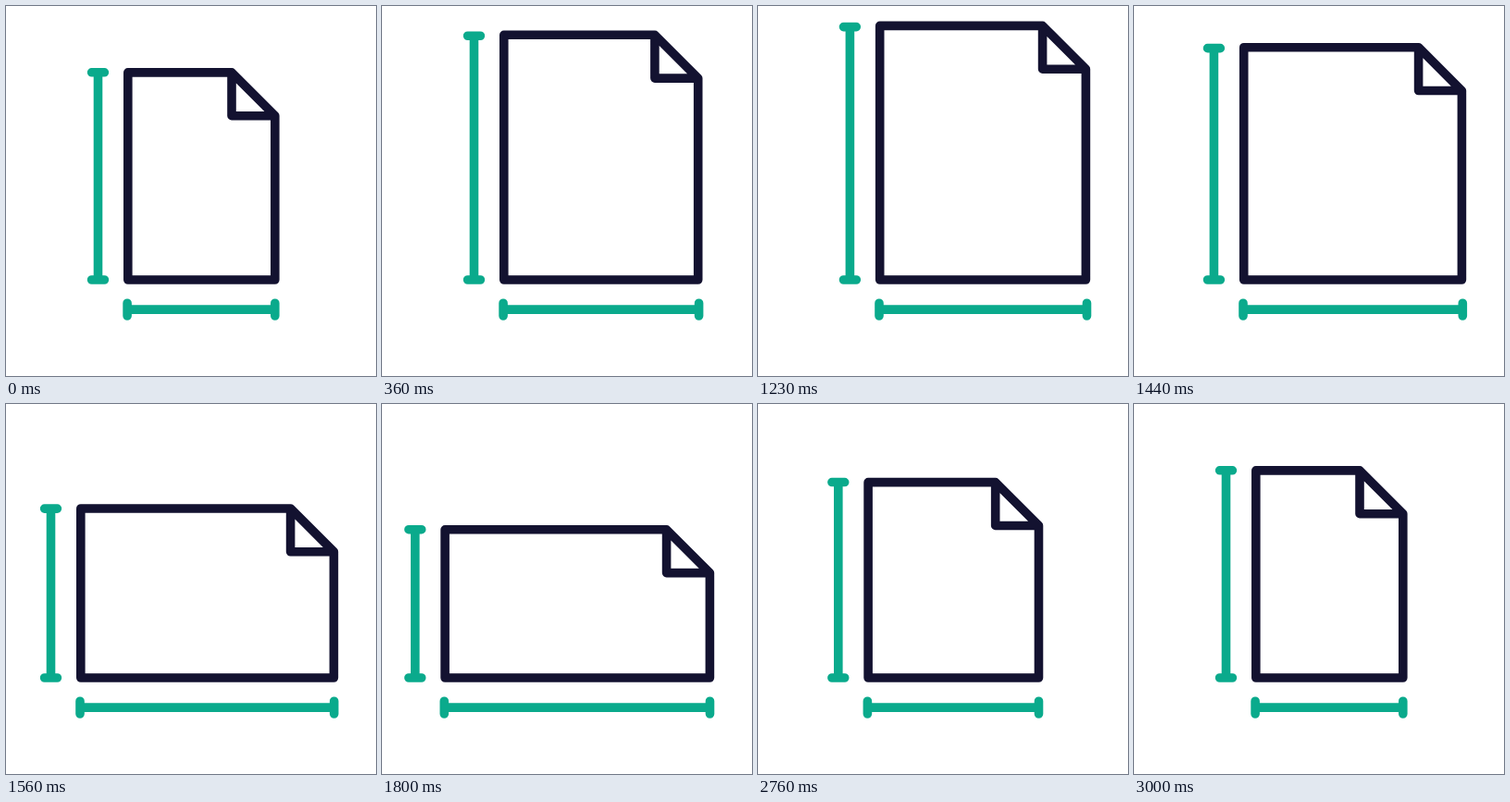
Recreate the animation shown at these times as an HTML page. Size 400 by 400 pixels, loop 4.03 s.

```html
<!DOCTYPE html>
<html lang="en">
<head>
<meta charset="utf-8">
<title>Page size</title>
<style>
  html, body { margin: 0; height: 100%; overflow: hidden; background: #fff; }
  svg { display: block; width: 100%; height: 100%; }
  path { fill: none; stroke-width: 9.6; stroke-linecap: round; stroke-linejoin: round; }
  #gauges { stroke: #0aaa8c; }
  #page { stroke: #131230; }
</style>
</head>
<body>
<svg viewBox="0 0 400 400">
  <path id="gauges"/>
  <path id="page"/>
</svg>
<script>
const LOOP = 4030, STEP = 1200, MOVE = 600;
const BOTTOM = 296, FOLD = 46.8, CAP = 6.9;

// page left, top, right; then gauge left, top, right
const poses = [
  [131.8, 71.9, 290.8, 131.1, 71.8, 290.8],
  [131.8, 21.2, 354.4, 131.1, 22.4, 355.5],
  [68.1, 135.8, 354.4, 67.3, 135.7, 354.5]
];

const gauges = document.getElementById('gauges');
const page = document.getElementById('page');

// cubic-bezier(.76, 0, .24, 1), solved by bisection
function ease(x) {
  if (x <= 0 || x >= 1) return x <= 0 ? 0 : 1;
  let lo = 0, hi = 1, s;
  for (let i = 0; i < 30; i++) {
    s = (lo + hi) / 2;
    const u = 1 - s;
    const bx = 3 * 0.76 * s * u * u + 3 * 0.24 * s * s * u + s ** 3;
    if (bx < x) lo = s; else hi = s;
  }
  return s * s * (3 - 2 * s);
}

function poseAt(t) {
  const i = Math.min(2, Math.floor(t / STEP));
  const k = ease((t - i * STEP) / MOVE);
  const next = poses[(i + 1) % 3];
  return poses[i].map((v, j) => v + (next[j] - v) * k);
}

const capH = (x, y) => `M${x - CAP} ${y}h${2 * CAP}`;
const capV = (x, y) => `M${x} ${y - CAP}v${2 * CAP}`;

function draw(t) {
  const [l, top, r, gl, gt, gr] = poseAt(t);
  const gx = l - 32.3, gy = 328.1;
  page.setAttribute('d',
    `M${l} ${top}H${r - FOLD}L${r} ${top + FOLD}V${BOTTOM}H${l}Z` +
    `M${r - FOLD} ${top}v${FOLD}h${FOLD}`);
  gauges.setAttribute('d',
    `M${gx} ${gt}V${BOTTOM}` + capH(gx, gt) + capH(gx, BOTTOM) +
    `M${gl} ${gy}H${gr}` + capV(gl, gy) + capV(gr, gy));
}

const start = performance.now();
function tick() {
  draw((performance.now() - start) % LOOP);
  requestAnimationFrame(tick);
}
tick();
</script>
</body>
</html>
```
